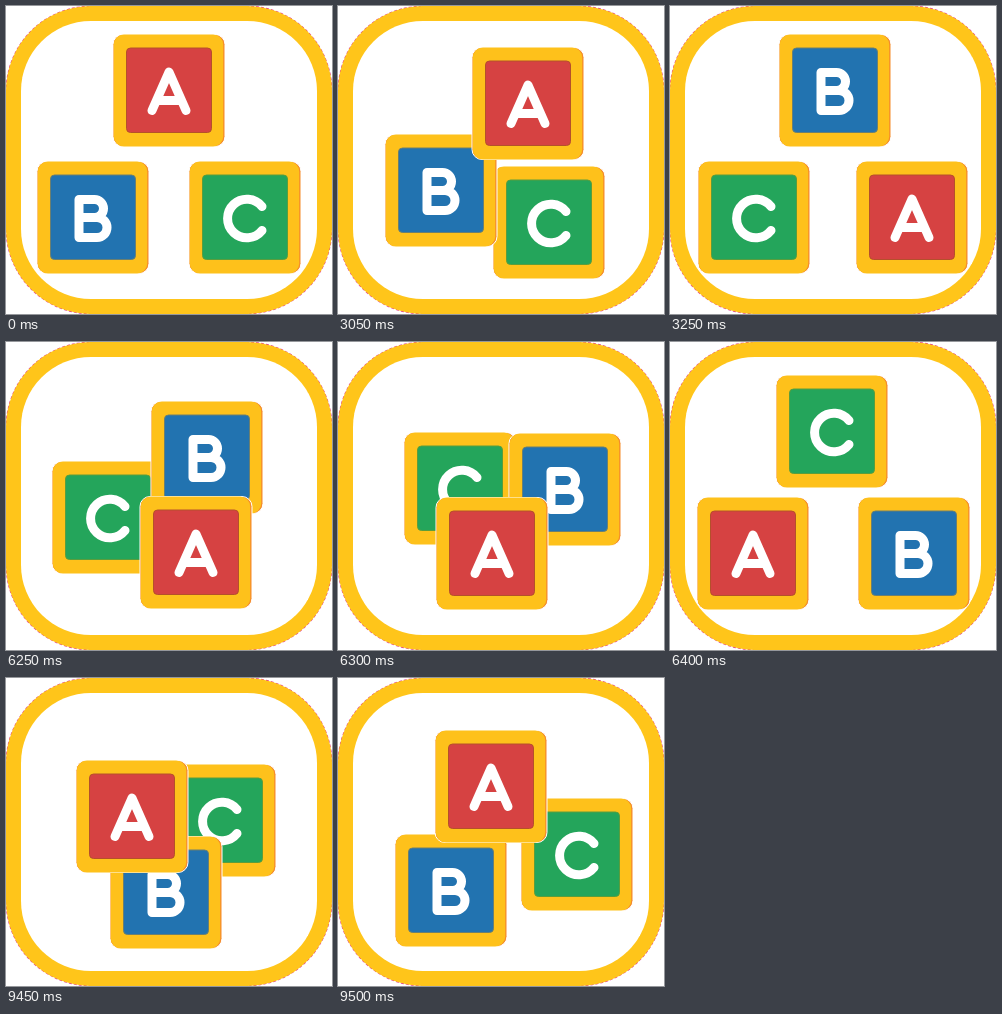
Recreate the animation shown at these times as an HTML page. Size 326 by 308 pixels, loop 9.55 s.

```html
<!DOCTYPE html>
<html lang="en">
<head>
<meta charset="utf-8">
<title>Alphabet blocks</title>
<style>
  html, body { margin: 0; width: 100%; height: 100%; overflow: hidden; background: #fff; }
  svg { display: block; width: 326px; height: 308px; }
  .letter { fill: none; stroke: #fff; stroke-width: 9; stroke-linecap: round; stroke-linejoin: round; }
</style>
</head>
<body>
<svg id="stage" viewBox="0 0 326 308" role="img" aria-label="Blocks A, B and C changing places">
  <rect width="326" height="308" fill="#fff"/>
  <rect x=".2" y=".2" width="325.6" height="307.6" rx="85" fill="none" stroke="#e0359b" stroke-width="1.2" stroke-dasharray="3 2"/>
  <rect width="326" height="308" rx="85" fill="#ffc51a"/>
  <rect x="15" y="15" width="296" height="278" rx="70" fill="#fff"/>
</svg>
<script>
const LOOP = 9550, STEP = 50;

// Listed from back to front.
const blocks = {
  C: { fill: '#24a55b', edge: '#5b9d3c', letter: 'M73 45.5A19.3 19.3 0 1 0 73 69.5' },
  B: { fill: '#2273b0', edge: '#6b7f70', letter: 'M42 38.5H57.5A9 9 0 0 1 57.5 56.5H42M57.5 56.5H60A10 10 0 0 1 60 76.5H42V38.5' },
  A: { fill: '#d64242', edge: '#b5502a', letter: 'M39 76.5L56 38L73 76.5M45 66.5H67' }
};

// Each shuffle starts at a time and advances one position per step.
const shuffles = [
  { start: 0,
    A: [[107, 28]], B: [[31, 155]], C: [[183, 155]] },
  { start: 3050,
    A: [[134, 41], [165, 67], [188, 95], [194, 125], [186, 155]],
    B: [[47, 128], [63, 103], [79, 78], [94, 53], [109, 28]],
    C: [[155, 160], [124, 160], [92, 159], [60, 157], [28, 155]] },
  { start: 6250,
    A: [[134, 154], [98, 155], [62, 155], [27, 155]],
    B: [[145, 59], [171, 91], [188, 123], [188, 155]],
    C: [[46, 119], [66, 90], [86, 61], [106, 33]] },
  { start: 9400,
    A: [[44, 113], [70, 82], [97, 52]],
    B: [[150, 156], [104, 158], [57, 156]],
    C: [[129, 55], [158, 86], [183, 120]] }
];

const stage = document.getElementById('stage');

function add(parent, tag, attributes) {
  const node = document.createElementNS('http://www.w3.org/2000/svg', tag);
  for (const name in attributes) node.setAttribute(name, attributes[name]);
  return parent.appendChild(node);
}

function addRect(parent, x, y, width, height, rx, fill, extra) {
  return add(parent, 'rect', { x, y, width, height, rx, fill, ...extra });
}

for (const block of Object.values(blocks)) {
  block.node = add(stage, 'g', {});
  addRect(block.node, 0, 0.5, 112, 112, 10, '#f58b2b', { stroke: '#fff', 'stroke-width': 1 });
  addRect(block.node, 0.8, 0.5, 109.4, 112, 10, '#fec11b');
  addRect(block.node, 13.5, 14, 85, 84.5, 4, block.fill, { stroke: block.edge, 'stroke-width': 1 });
  add(block.node, 'path', { d: block.letter, class: 'letter' });
}

function draw(time) {
  const t = time % LOOP;
  const shuffle = shuffles.findLast(s => t >= s.start);
  const step = Math.floor((t - shuffle.start) / STEP);
  for (const name in blocks) {
    const path = shuffle[name];
    const [x, y] = path[Math.min(step, path.length - 1)];
    blocks[name].node.setAttribute('transform', `translate(${x} ${y})`);
  }
}

const began = performance.now();
function tick() {
  draw(performance.now() - began);
  requestAnimationFrame(tick);
}
tick();
</script>
</body>
</html>
```
